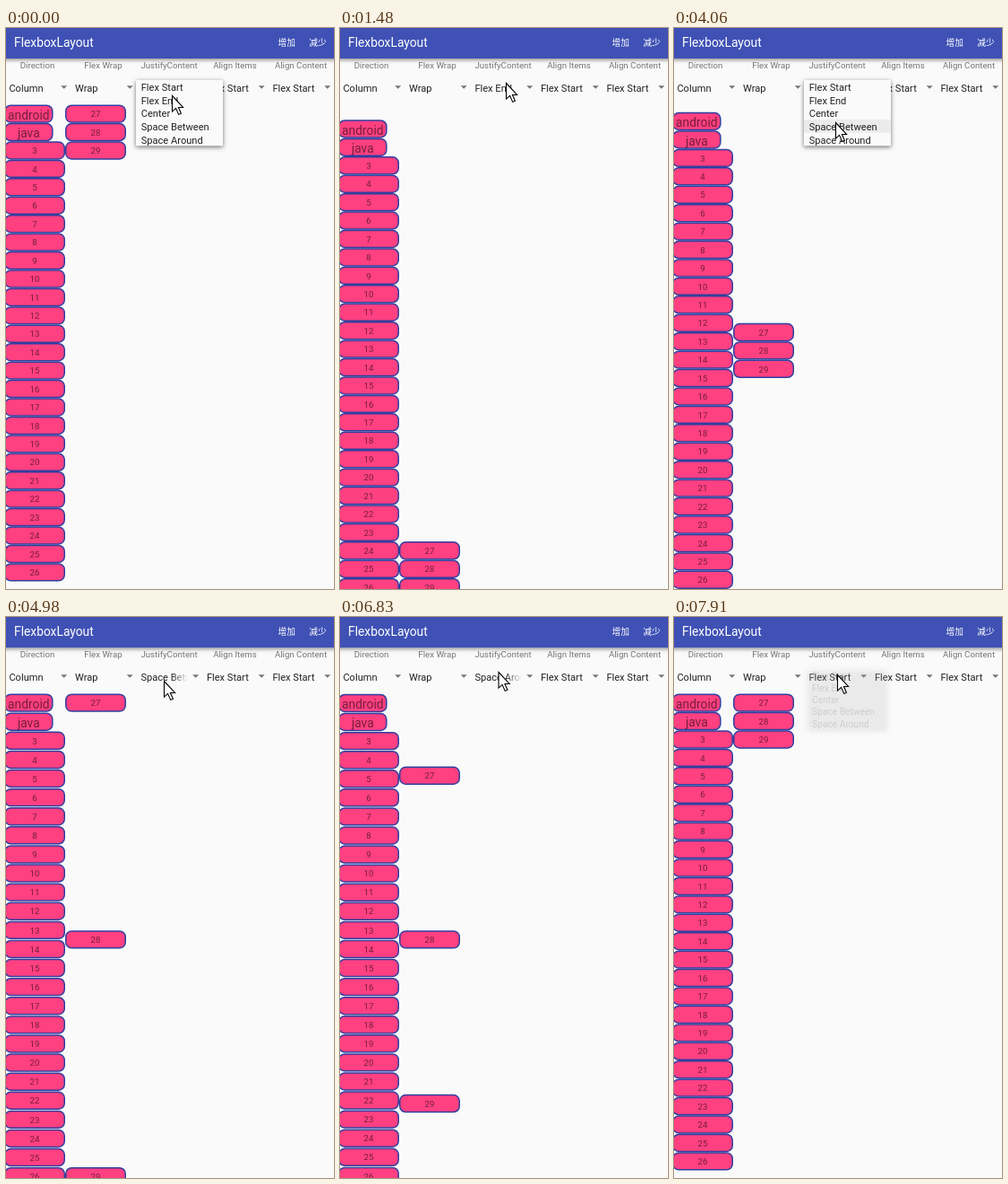
Write an HTML page with a canvas that moves like this. It is 366 px wide and 625 px high and loops after 8000 ms.

```html
<!DOCTYPE html>
<html lang="en">
<head>
<meta charset="utf-8">
<title>FlexboxLayout</title>
<style>
  html, body { margin: 0; width: 100%; height: 100%; overflow: hidden; background: #fafafa; }
  canvas { display: block; width: 366px; height: 625px; }
</style>
</head>
<body>
<canvas id="stage"></canvas>
<script>
const W = 366, H = 625, LOOP = 8000;
const canvas = document.getElementById('stage');
const ctx = canvas.getContext('2d');
const dpr = window.devicePixelRatio || 1;
canvas.width = W * dpr;
canvas.height = H * dpr;

const FONT = 'Roboto, "Noto Sans CJK SC", "Noto Sans CJK", sans-serif';
const OPTIONS = ['Flex Start', 'Flex End', 'Center', 'Space Between', 'Space Around'];
const LABELS = ['Direction', 'Flex Wrap', 'JustifyContent', 'Align Items', 'Align Content'];
const COL = 73.5;                       // spinner column pitch
const TOP = 85.4, SPAN = 548, ITEM = 20.43;
const MENU = { x: 145, y: 58, w: 97, row: 14.65 };

// Dropdown sessions: opening, highlight, chosen row, dismissal, step of the fade
const SESSIONS = [
  { open: -500, press: 500, row: 1, close: 650, fade: 140 },
  { open: 1630, press: 2580, row: 2, close: 2580, fade: 0 },
  { open: 2980, press: 4060, row: 3, close: 4180, fade: 130 },
  { open: 5130, press: 5800, row: 4, close: 5800, fade: 0 },
  { open: 7130, press: 7650, row: 0, close: 7780, fade: 130 }
];

// Pointer moves: start, end, number of hard steps, destination
const MOVES = [
  [1480, 1480, 1, 185, 61],
  [1780, 2030, 3, 179, 88],
  [2710, 2850, 2, 181, 64],
  [3250, 3510, 3, 180, 96],
  [3630, 3630, 1, 180, 105],
  [4570, 4980, 4, 176, 71],
  [5270, 5410, 2, 178, 122],
  [6250, 6830, 5, 176.5, 61],
  [7260, 7390, 2, 182, 64]
];

function pointerAt(t) {
  let x = 185, y = 75;
  for (const [start, end, steps, toX, toY] of MOVES) {
    if (t < start) break;
    const done = t >= end ? steps : 1 + Math.floor((t - start) / (end - start) * (steps - 1));
    x += (toX - x) * done / steps;
    y += (toY - y) * done / steps;
  }
  return [x, y];
}

function justifyAt(t) {
  return SESSIONS.reduce((mode, s) => t >= s.close ? s.row : mode, 0);
}

function menuAt(t) {
  const s = SESSIONS.find(s => t >= s.open && t < s.close + 2 * s.fade);
  if (!s) return null;
  if (t >= s.close + s.fade) return { alpha: 0.14, scale: 0.92, row: -1 };
  if (t >= s.close) return { alpha: 0.6, scale: 0.97, row: -1 };
  if (t < s.open + 130) return { alpha: 0.7, scale: 0.97, row: -1 };
  return { alpha: 1, scale: 1, row: t >= s.press ? s.row : -1 };
}

function text(str, x, y, size, color, align = 'left') {
  ctx.font = `${size}px ${FONT}`;
  ctx.textAlign = align;
  ctx.fillStyle = color;
  ctx.fillText(str, x, y);
}

function shadow(color, blur, dy) {
  ctx.shadowColor = color;
  ctx.shadowBlur = blur * dpr;
  ctx.shadowOffsetY = dy * dpr;
}

function tag(str, x, y, w, size) {
  ctx.beginPath();
  ctx.roundRect(x + 0.75, y + 0.75, w - 1.5, ITEM - 1.5, 6.5);
  ctx.fillStyle = '#ff4081';
  ctx.fill();
  ctx.strokeStyle = '#303f9f';
  ctx.lineWidth = 1.5;
  ctx.stroke();
  text(str, x + w / 2, y + ITEM / 2 + (size > 10 ? 6.2 : 3.7), size, 'rgba(0,0,0,.54)', 'center');
}

function column(names, x, mode) {
  const n = names.length, free = SPAN - n * ITEM;
  const lead = [0, free, free / 2, 0, free / n / 2][mode];
  const gap = [0, 0, 0, free / (n - 1), free / n][mode];
  names.forEach((name, i) => {
    const word = isNaN(name);
    tag(String(name), x, TOP + lead + i * (ITEM + gap), word ? 54.6 : 68, word ? 13.8 : 9.7);
  });
}

const range = (from, to) => Array.from({ length: to - from + 1 }, (_, i) => from + i);
const FIRST = ['android', 'java', ...range(3, 26)];
const SECOND = range(27, 29);

function toolbar() {
  ctx.save();
  shadow('rgba(0,0,0,.4)', 4, 1.5);
  ctx.fillStyle = '#3f51b5';
  ctx.fillRect(-10, -10, W + 20, 44);
  ctx.restore();
  text('FlexboxLayout', 9, 20.8, 13.8, '#fff');
  text('增加', 313.3, 19.6, 9.7, '#fff', 'center');
  text('减少', 348, 19.6, 9.7, '#fff', 'center');
}

function spinners(mode) {
  const values = ['Column', 'Wrap', OPTIONS[mode], 'Flex Start', 'Flex Start'];
  values.forEach((value, i) => {
    const x = i * COL;
    text(LABELS[i], x + 35, 44.7, 9.7, '#757575', 'center');
    let ink = '#212121';
    if (value.startsWith('Space')) {
      ink = ctx.createLinearGradient(x + 38, 0, x + 56, 0);
      ink.addColorStop(0, 'rgba(33,33,33,1)');
      ink.addColorStop(1, 'rgba(33,33,33,0)');
    }
    text(value, x + 3.4, 70.5, 11.1, ink);
    ctx.fillStyle = '#757575';
    ctx.beginPath();
    ctx.moveTo(x + 61.2, 64.2);
    ctx.lineTo(x + 68.2, 64.2);
    ctx.lineTo(x + 64.7, 67.8);
    ctx.fill();
  });
}

function menu({ alpha, scale, row }) {
  const { x, y, w, row: h } = MENU, mid = x + w / 2;
  ctx.save();
  ctx.globalAlpha = alpha;
  ctx.translate(mid, y);
  ctx.scale(scale, scale);
  ctx.translate(-mid, -y);
  ctx.save();
  shadow('rgba(0,0,0,.55)', 5, 1.5);
  ctx.fillStyle = '#fafafa';
  ctx.beginPath();
  ctx.roundRect(x, y, w, h * 5, 1);
  ctx.fill();
  ctx.restore();
  if (row >= 0) {
    ctx.fillStyle = '#ebebeb';
    ctx.fillRect(x, y + row * h, w, h);
  }
  OPTIONS.forEach((name, i) => text(name, x + 5.7, y + 12 + i * h, 11.1, '#212121'));
  ctx.restore();
}

function pointer(x, y) {
  ctx.save();
  ctx.translate(x + 0.5, y + 0.5);
  ctx.scale(1.1, 1.1);
  ctx.beginPath();
  ctx.moveTo(0, 0);
  for (const [px, py] of [[0, 16], [3.7, 12.6], [6.5, 19], [9, 18], [6.3, 11.8], [11, 11.8]]) ctx.lineTo(px, py);
  ctx.closePath();
  ctx.fillStyle = '#fff';
  ctx.fill();
  ctx.strokeStyle = '#000';
  ctx.lineWidth = 1;
  ctx.stroke();
  ctx.restore();
}

function draw(t) {
  const mode = justifyAt(t), popup = menuAt(t);
  ctx.setTransform(dpr, 0, 0, dpr, 0, 0);
  ctx.fillStyle = '#fafafa';
  ctx.fillRect(0, 0, W, H);
  spinners(mode);
  toolbar();
  column(FIRST, -2, mode);
  column(SECOND, 66, mode);
  if (popup) menu(popup);
  pointer(...pointerAt(t));
}

const began = performance.now();
function tick() {
  draw((performance.now() - began) % LOOP);
  requestAnimationFrame(tick);
}
tick();
</script>
</body>
</html>
```
